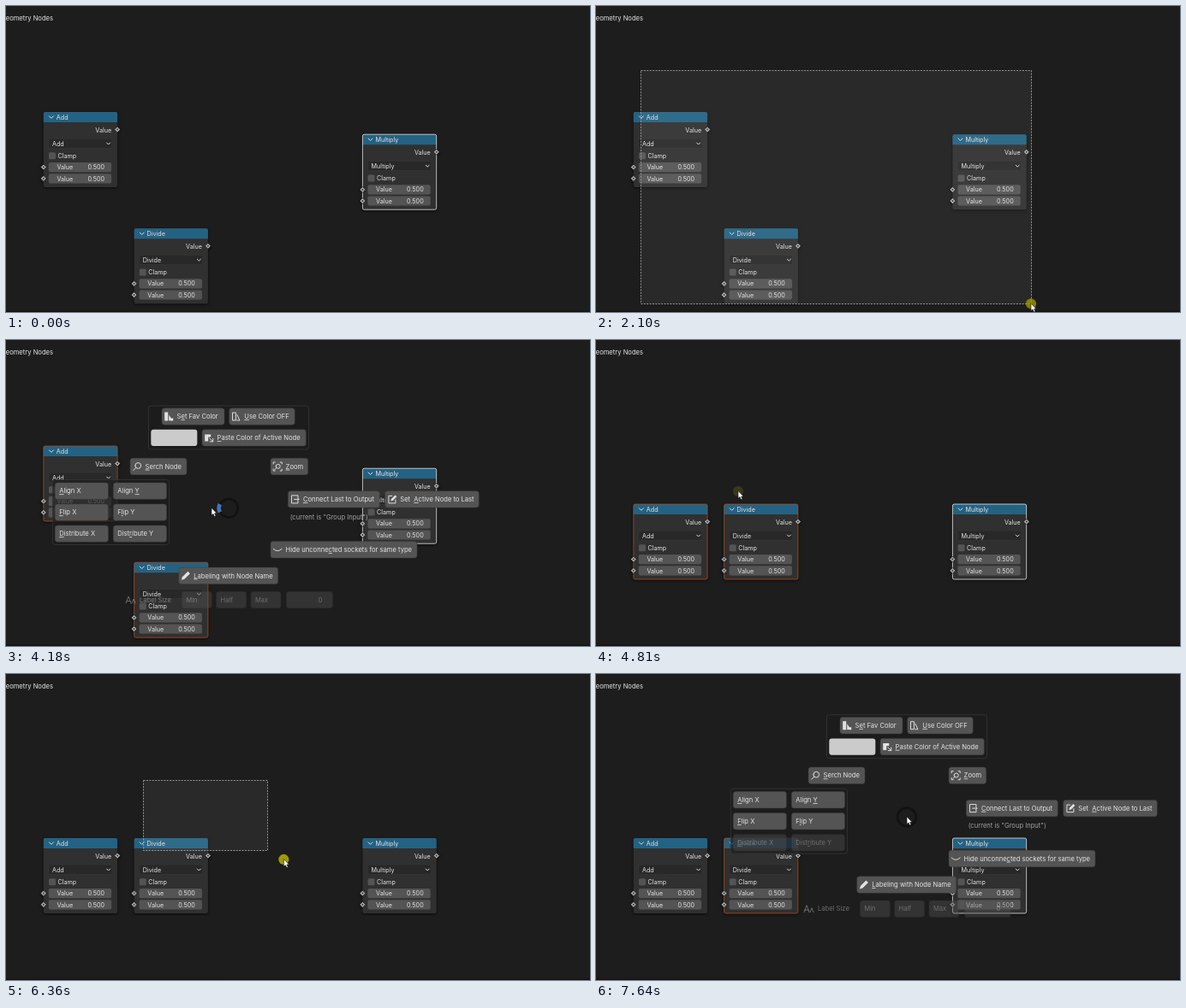
Recreate the animation shown at these times as an HTML page. Size 682 px wide and 358 px high, loop 8 s.

```html
<!DOCTYPE html>
<html lang="en">
<head>
<meta charset="utf-8">
<title>Node alignment</title>
<style>
  html, body { margin: 0; width: 100%; height: 100%; overflow: hidden; background: #1d1d1d; }
  svg { display: block; width: 682px; height: 358px; }
  text { font: 7.2px Inter, sans-serif; fill: #e4e4e4; white-space: pre; }
  .menu text, .big { font-size: 7.6px; }
  .under { text-decoration: underline; }
  .end { text-anchor: end; }
  .node { filter: drop-shadow(0 1px 1.5px #000a); }
  .body { fill: #303030; }
  .drop { fill: #282828; stroke: #3b3b3b; stroke-width: .5; }
  .field { fill: #545454; }
  .frame { fill: none; stroke: none; stroke-width: .8; }
  .frame.picked { stroke: #b04d1e; }
  .frame.active { stroke: #e8e8e8; }
  .line { fill: none; stroke: #dcdcdc; stroke-linecap: round; stroke-linejoin: round; }
  .solid { fill: #e2e2e2; }
  .socket { fill: #b0b0b0; stroke: #141414; stroke-width: .7; }
  .button { fill: #545454; stroke: #3a3a3a; stroke-width: .5; }
  .button.hover { fill: #6b6b6b; }
  .swatch { fill: #cbcbcb; }
  .panel { fill: #1d1d1d; fill-opacity: .68; stroke: #363636; stroke-width: .8; }
  .off { opacity: .4; }
  #band { fill: #fff; fill-opacity: .055; stroke: #a2a2a2; stroke-width: .9; stroke-dasharray: 2 1.4; }
</style>
</head>
<body>
<svg id="stage" viewBox="0 0 682 358"></svg>
<script>
const LOOP = 8000, STEP = 70;
const stage = document.getElementById('stage');

// Drawing helpers; text is placed by the middle of its capitals, "_" underlines the next letter
const rect = (x, y, w, h, cls, r = 2.5) =>
  `<rect x="${x}" y="${y}" width="${w}" height="${h}" rx="${r}" class="${cls}"/>`;
const line = d => `<path class="line" d="${d}"/>`;
const solid = d => `<path class="solid" d="${d}"/>`;
const label = (x, y, s, cls = '') =>
  `<text x="${x}" y="${y + 2.7}" class="${cls}">${s.replace(/_(.)/, '<tspan class="under">$1</tspan>')}</text>`;

const socket = (x, y) => `<path class="socket" d="M${x} ${y - 3.4}l3.4 3.4l-3.4 3.4l-3.4 -3.4z"/>
  <circle cx="${x}" cy="${y}" r="1" fill="#333"/>`;
const valueRow = y => rect(6, y - 5.6, 73.3, 11.2, 'field', 2)
  + label(15.7, y, 'Value') + label(71.3, y, '0.500', 'end') + socket(0, y);

const node = name => `<g id="${name}" class="node">
  ${rect(0, 0, 86.3, 88, 'body', 2)}
  <path fill="#246283" d="M0 12V2Q0 0 2 0H84.3Q86.3 0 86.3 2V12z"/>
  ${line('M6.6 4.8l2.5 2.5l2.5 -2.5')}${label(15, 6, name)}
  ${label(79.3, 20.8, 'Value', 'end')}
  ${rect(6, 31, 74, 11.4, 'drop', 2)}${label(10.2, 36.8, name)}${line('M73.8 36l2 2l2 -2')}
  ${rect(6.2, 47.2, 8, 8, 'field', 1.5)}${label(16.7, 51.2, 'Clamp')}
  ${rect(0, 0, 86.3, 88, 'frame', 2)}
  ${valueRow(64.6)}${valueRow(77.8)}${socket(86.3, 20.6)}
</g>`;

// Icons in a 12 by 12 cell
const icons = {
  paint: solid('M1 1h4v10h-4zM6 4l4 6l-4 1zM8 8h3v3h-3z'),
  unpaint: line('M2 1.5h3.5v9h-3.5zM7 4l3 6.5h-3'),
  paste: solid('M1 2h7v3h-3v5h-4z') + line('M6.5 6.5l4 4M10.5 7v3.5h-3.5'),
  search: line('M3.6 5a3.4 3.4 0 1 1 6.8 0a3.4 3.4 0 1 1 -6.8 0M4.5 7.5l-3 3'),
  zoom: line('M4 5.8a2.5 2.5 0 1 1 5 0a2.5 2.5 0 1 1 -5 0M4.7 7.6l-2 2M1 3v-2h2M9 1h2v2M11 9v2h-2M1 9v2h2'),
  output: line('M9.5 4v-2.5h-7.5v9h7.5v-2.5M5 6h5.5M9 4.5l1.5 1.5l-1.5 1.5'),
  edit: line('M6 2h-4v8.5h8v-4') + solid('M4.5 8l.6-2.5l4.5-4.5l1.8 1.8l-4.5 4.5z'),
  eye: line('M1 5q5 5 10 0'),
  pencil: solid('M1 11l1-3.5l6.5-6.5l2.5 2.5l-6.5 6.5z')
};
const button = (x, y, w, text, icon) => rect(x, y - 9.7, w, 19.4, 'button', 3)
  + (icon ? `<g transform="translate(${x + 2.2} ${y - 6})">${icons[icon]}</g>` : '')
  + label(x + (icon ? 17.6 : 5), y, text);
const item = (cx, cy, body) => `<g class="item" data-x="${cx}" data-y="${cy}">${body}</g>`;

const hub = { x: 260, y: 196.7 };
const tools = ['_Align', '_Flip', '_Distribute'].map((tool, row) => {
  const y = 176.6 + row * 25;
  const second = ['Align _Y', 'F_lip Y', 'Dist_ribute Y'][row];
  return `<g id="tool${row}">${button(57.2, y, 62.2, tool + ' X')}${button(125.3, y, 62.2, second)}</g>`;
}).join('');
const sizes = ['Min', 'Half', 'Max'].map((s, i) => button(205.3 + i * 40.3, 304, 35, s)).join('');

const menu = `<g id="menu" class="menu">
  <circle cx="${hub.x}" cy="${hub.y}" r="10.8" fill="#1d1d1d" stroke="#121212" stroke-width="2.6"/>
  <path id="wedge" d="M10.3 -4.8A11.3 11.3 0 0 1 10.3 4.8" fill="none" stroke="#4772b3" stroke-width="4.5"/>
  ${item(260, 102, rect(166.5, 77, 187, 51, 'panel', 3)
    + button(182, 89.5, 73, 'S_et Fav Color', 'paint') + button(260.7, 89.5, 76.5, '_Use Color OFF', 'unpaint')
    + rect(169.3, 104.7, 54, 19.4, 'swatch', 3) + button(229, 114.4, 121.3, '_Paste Color of Active Node', 'paste'))}
  ${item(178, 148, button(145, 148, 66, '_Serch Node', 'search'))}
  ${item(331, 148, button(309, 148, 43.7, '_Zoom', 'zoom'))}
  ${item(122, 201, rect(54.4, 163.5, 136, 76, 'panel', 3) + tools)}
  ${item(441, 190, button(329.3, 186.4, 107, '_Connect Last to Output', 'output')
    + button(442.7, 186.4, 109.6, 'Set  _Active Node to Last', 'edit')
    + `<g opacity=".65">${label(331.7, 207, '(current is "Group Input")')}</g>`)}
  ${item(394, 245, button(309, 245.3, 171, 'Hide unconne_cted sockets for same type', 'eye'))}
  ${item(261, 290, button(201.7, 275.8, 116, '_Labeling with Node Name', 'pencil')
    + `<g class="off">${line('M140 308l3 -8l3 8M141 305.5h4M147 308l2 -5l2 5')}${label(156, 304, 'Label Size')}
      ${sizes}${rect(327.5, 294.3, 54, 19.4, 'button', 3)}${label(364.5, 304, '0')}</g>`)}
</g>`;

stage.innerHTML = `<rect width="682" height="358" fill="#1d1d1d"/>
  <rect y="356.6" width="682" height="1.4" fill="#131313"/>
  ${label(55, 14, 'Geometry Nodes', 'big end')}
  ${['Add', 'Divide', 'Multiply'].map(node).join('')}
  <rect id="band"/>
  ${menu}
  <g id="pointer"><circle id="press" r="6.1" fill="#aca800"/>
    <path d="M0 -.4V8.3L2 6.6L3.4 9.6L5 8.9L3.6 6H6.2z" fill="#fff" stroke="#111" stroke-width=".6"/></g>`;

const $ = id => document.getElementById(id);
const items = [...stage.querySelectorAll('.item')];
const alignY = stage.querySelectorAll('#tool0 .button')[1];
const show = (el, on) => el.setAttribute('visibility', on ? 'visible' : 'hidden');
const move = (el, x, y, extra = '') => el.setAttribute('transform', `translate(${x} ${y})${extra}`);

// Main events, in ms
const DESELECT = 1190, SELECT = 2230, OPEN = 2920, ALIGN = 4600,
  CLEAR = 6020, RESELECT = 6770, REOPEN = 7640;

const easeOut = u => u * (2 - u);
const smooth = u => u * u * (3 - 2 * u);

// Each move bends from the end of the last one to its own end
const start = { x: 326, y: 316 };
const moves = [
  { from: 400, to: 1190, x: 53, y: 76, ease: smooth },
  { from: DESELECT, to: 2030, x: 508, y: 348.3, via: { x: 172, y: 231.5 }, ease: easeOut },
  { from: 2160, to: 2860, x: 260, y: 196.5, ease: smooth },
  { from: 4110, to: 4730, x: 166, y: 177, via: { x: 213, y: 200 }, ease: easeOut },
  { from: 5140, to: 5550, x: 302, y: 281.8, ease: smooth },
  { from: 5550, to: CLEAR, x: 160, y: 124, ease: smooth },
  { from: CLEAR, to: 6570, x: 480, y: 305, ease: smooth },
  { from: 6700, to: 7040, x: 527, y: 216.3, ease: smooth },
  { from: 7040, to: 7510, x: 363, y: 167.3, ease: smooth }
];
const moveAt = t => moves.findLastIndex(m => m.from <= t);

function pointerAt(t) {
  const i = moveAt(t);
  if (i < 0) return start;
  const m = moves[i], a = moves[i - 1] ?? start;
  const s = m.ease(Math.min(1, (t - m.from) / (m.to - m.from)));
  const bend = k => {
    const c = m.via ? m.via[k] : (a[k] + m[k]) / 2;
    return (1 - s) ** 2 * a[k] + 2 * s * (1 - s) * c + s * s * m[k];
  };
  return { x: bend('x'), y: bend('y') };
}

// The pointer refreshes in steps counted from the start of each move
function hold(t) {
  const from = moves[moveAt(t)]?.from ?? 0;
  return from + Math.floor((t - from) / STEP + .01) * STEP;
}

const presses = [[1120, 2040], [4530, ALIGN], [CLEAR, 6760]];
const FADE = 270;
function pressAt(t) {
  const p = presses.find(([on, off]) => t >= on && t < off + FADE);
  return p ? .9 * (1 - Math.max(0, t - p[1]) / FADE) : 0;
}

const drags = [{ from: 1250, to: SELECT, x: 52.5, y: 75.5 }, { from: 6080, to: RESELECT, x: 160.5, y: 124.5 }];
function drawBand(t) {
  const d = drags.find(d => t >= d.from && t < d.to);
  show($('band'), d);
  if (!d) return;
  const end = pointerAt(hold(t) - 22);
  const box = { x: d.x, y: d.y, width: Math.max(0, Math.round(end.x - d.x)), height: Math.max(0, Math.round(end.y - d.y)) };
  for (const key in box) $('band').setAttribute(key, box[key]);
}

function drawNodes(t) {
  const all = t >= SELECT && t < CLEAR;
  const again = t >= RESELECT;
  const set = (id, x, y, state) => {
    move($(id), x, t >= ALIGN ? 192 : y);
    $(id).querySelector('.frame').setAttribute('class', 'frame ' + state);
  };
  set('Add', 43.8, 124, all ? 'picked' : '');
  set('Divide', 149.6, 260.2, all || again ? 'picked' : '');
  set('Multiply', 416.4, 150.2, t < DESELECT || all || again ? 'active' : '');
}

function drawMenu(t, p) {
  const second = t >= REOPEN;
  const open = second || (t >= OPEN && t < ALIGN);
  show($('menu'), open);
  show($('wedge'), false);
  if (!open) return;
  const [dx, dy] = second ? [103, -29.3] : [0, 0];
  move($('menu'), dx, dy);
  $('tool2').setAttribute('class', second ? 'off' : '');
  alignY.setAttribute('class', !second && p.x < 187 ? 'button hover' : 'button');
  const grow = Math.min(1, (t - OPEN + STEP) / (4 * STEP));
  for (const el of items)
    move(el, (hub.x - el.dataset.x) * (1 - grow), (hub.y - el.dataset.y) * (1 - grow));
  const vx = p.x - dx - hub.x, vy = p.y - dy - hub.y;
  show($('wedge'), Math.hypot(vx, vy) > 8);
  move($('wedge'), hub.x, hub.y, ` rotate(${Math.atan2(vy, vx) * 180 / Math.PI})`);
}

function draw(now) {
  const t = now % LOOP;
  const p = pointerAt(hold(t));
  drawNodes(t);
  drawBand(t);
  drawMenu(t, p);
  show($('pointer'), t >= 400);
  move($('pointer'), p.x, p.y);
  $('press').setAttribute('opacity', pressAt(t));
}

let begin;
function tick(now) {
  begin ??= now;
  draw(now - begin);
  requestAnimationFrame(tick);
}
draw(0);
requestAnimationFrame(tick);
</script>
</body>
</html>
```
